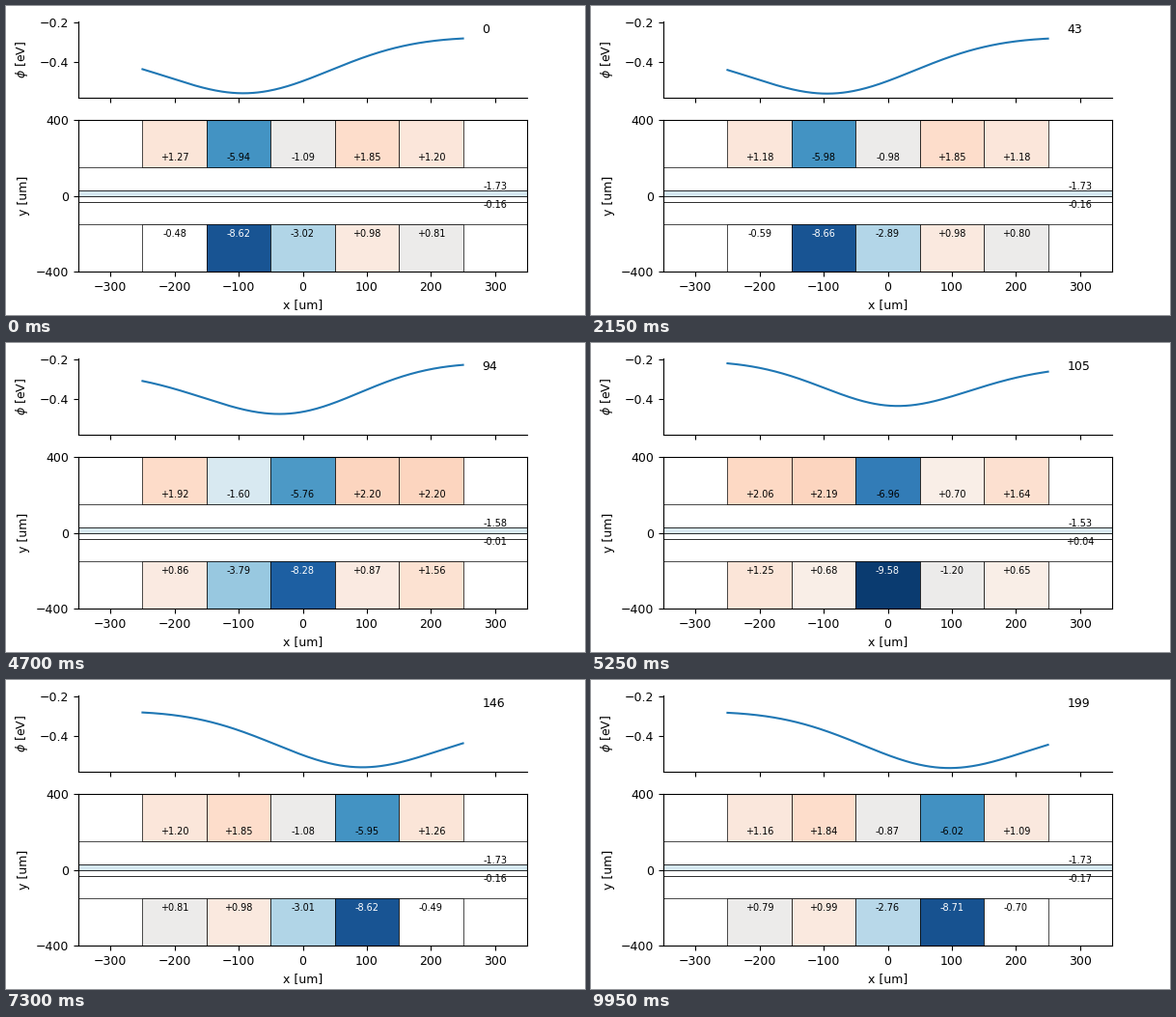
A matplotlib script for the animation above (10000 ms loop, 600 px wide and 320 px high).

```python
from math import atan, erf, exp, pi

import numpy as np
import matplotlib.pyplot as plt
from matplotlib.animation import FuncAnimation
from matplotlib.patches import Rectangle

FRAMES, INTERVAL = 200, 50
SITES = np.arange(-200, 201, 100)
x = np.linspace(-250, 250, 251)
cmap = plt.get_cmap("RdBu_r")

# Key voltages (top row, bottom row) for four wells left of the centre;
# wells on the right mirror them
KEYS = {
    -0.970: ([1.09, -6.02, -0.87, 1.84, 1.16], [-0.70, -8.71, -2.76, 0.99, 0.79]),
    -0.904: ([1.40, -5.90, -1.25, 1.87, 1.22], [-0.31, -8.57, -3.21, 0.98, 0.83]),
    -0.686: ([2.26, -4.95, -3.09, 2.03, 1.61], [0.92, -7.49, -5.32, 0.95, 1.15]),
    -0.384: ([1.92, -1.60, -5.76, 2.20, 2.20], [0.86, -3.79, -8.28, 0.87, 1.56]),
}
wells = np.array(list(KEYS))
rows = np.array(list(KEYS.values()))
coefs = np.polyfit(np.concatenate([wells, -wells]),
                   np.concatenate([rows, rows[:, :, ::-1]]).reshape(8, 10), 7)


def well(n):
    """Fast shuttle plus slow drift, after a short settling at the start."""
    u = n - 101.75
    shuttle = 0.735 * erf(u / 19)
    drift = 0.27 * atan(u / 20) * 2 / pi
    return shuttle + drift + 0.042 * exp(-n / 3)


def voltages(n):
    v = np.vander([well(n)], 8)[0] @ coefs
    lower = 0.095 * v[5:].sum() + 0.8217
    return np.append(v, [lower, lower - 1.568])


def potential(v):
    pairs = v[:5] + v[5:10]
    response = (1 + ((x[:, None] - SITES) / 240) ** 2) ** -1.5
    return -0.2245 + 0.32 * v[10] + 0.0183 * response @ pairs


def shade(v):
    # The palest tones collapse to white or light grey
    if -0.8 < v < 0.5:
        return "white"
    if -1.2 < v <= -0.8 or 0.75 < v < 0.825:
        return "#ecebea"
    return cmap((v + 10) / 20)


plt.rcParams.update({"font.family": "DejaVu Sans", "font.size": 9})
fig, (ax_phi, ax) = plt.subplots(
    2, 1, sharex=True, figsize=(6, 3.2), dpi=100,
    gridspec_kw=dict(height_ratios=[1, 2], hspace=0.2, left=0.125,
                     right=0.9, bottom=0.14, top=0.95))

ax_phi.spines[["top", "right"]].set_visible(False)
ax_phi.set_ylim(-0.578, -0.195)
ax_phi.set_yticks([-0.4, -0.2])
ax_phi.set_ylabel(r"$\phi$ [eV]")
ax_phi.tick_params(labelbottom=False)
curve, = ax_phi.plot(x, 0 * x, color="tab:blue", lw=1.5)
counter = ax_phi.text(0.9, 0.85, "", transform=ax_phi.transAxes)

ax.set_xlim(-350, 350)
ax.set_ylim(-400, 400)
ax.set_xticks(range(-300, 301, 100))
ax.set_yticks([-400, 0, 400])
ax.set_xlabel("x [um]")
ax.set_ylabel("y [um]")
fig.align_ylabels()


def box(left, bottom, width, height):
    return ax.add_patch(Rectangle((left, bottom), width, height,
                                  fc="white", ec="black", lw=0.5))


def label(px, py):
    return ax.text(px, py, "", fontsize=7, ha="center", va="center")


for low in (30, -150):
    box(-350, low, 700, 120)
pads = [box(s - 50, low, 100, 250) for low in (150, -400) for s in SITES]
pads += [box(-350, low, 700, 30) for low in (-30, 0)]
labels = [label(s, py) for py in (200, -200) for s in SITES]
labels += [label(300, py) for py in (-50, 50)]


def draw(n):
    v = voltages(n)
    curve.set_ydata(potential(v))
    counter.set_text(str(n))
    for pad, text, volt in zip(pads, labels, v):
        pad.set_facecolor(shade(volt))
        text.set_text(f"{volt:+.2f}")
        text.set_color("white" if volt < -8 else "black")
    return [curve, counter, *pads, *labels]


anim = FuncAnimation(fig, draw, frames=FRAMES, interval=INTERVAL,
                     repeat=True, repeat_delay=0)
plt.show()
```
